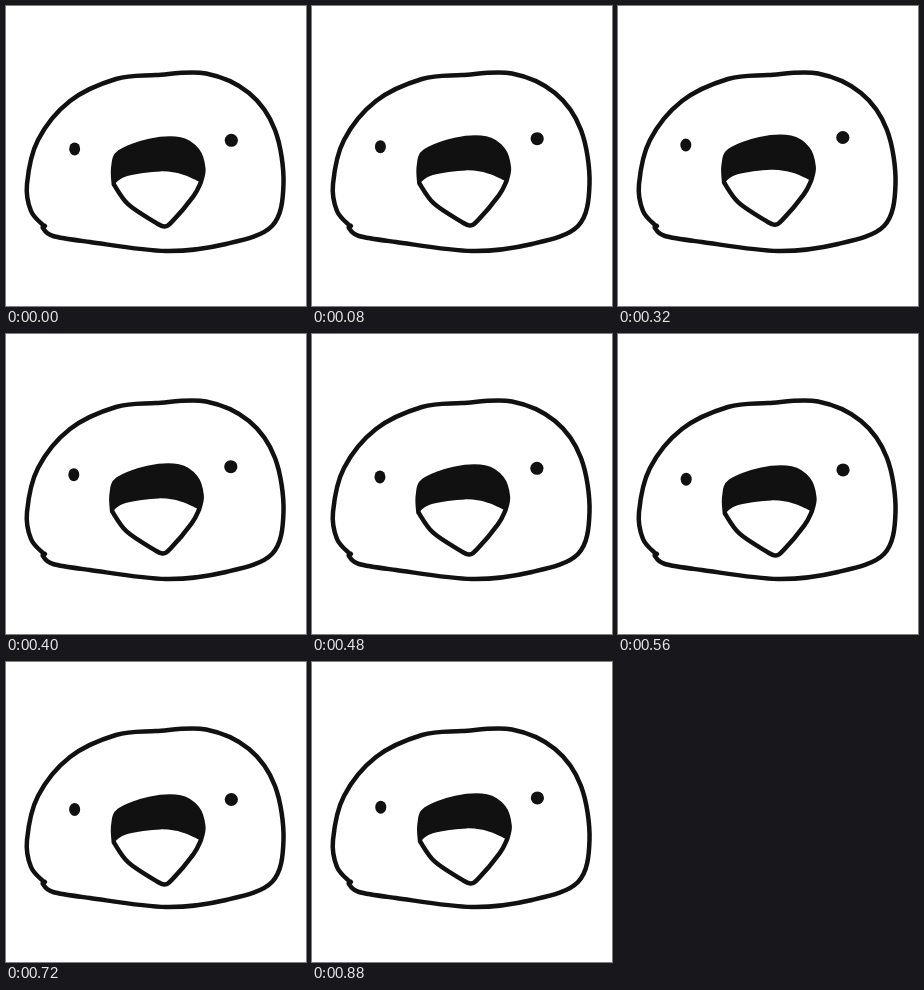
An HTML page that plays this animation: 300x300 px, repeating every 0.98 s.

```html
<!DOCTYPE html>
<html lang="en">
<head>
<meta charset="utf-8">
<title>Bird face</title>
<style>
  html, body { margin: 0; width: 100%; height: 100%; overflow: hidden; background: #fff; }
  svg { display: block; width: 100vw; height: 100vh; }
  .line { fill: none; stroke: #111; stroke-width: 4.5; stroke-linecap: round; stroke-linejoin: round; }
  .ink { fill: #111; }
</style>
</head>
<body>
<svg viewBox="0 0 300 300">
  <path id="head" class="line"/>
  <ellipse id="left" class="ink" rx="5.5" ry="6.5"/>
  <ellipse id="right" class="ink" rx="6.6" ry="6.5"/>
  <g id="mouth">
    <path id="gape" class="ink"/>
    <path id="beak" class="line"/>
  </g>
</svg>
<script>
const $ = id => document.getElementById(id);

// Smooth open curve through a string of "x,y" points
function curve(text) {
  const p = text.split(' ').map(s => s.split(',').map(Number));
  const at = i => p[Math.max(0, Math.min(p.length - 1, i))];
  let d = 'M' + p[0];
  for (let i = 0; i < p.length - 1; i++) {
    const [a, b, c, e] = [at(i - 1), at(i), at(i + 1), at(i + 2)];
    const c1 = b.map((v, k) => v + (c[k] - a[k]) / 6);
    const c2 = c.map((v, k) => v - (e[k] - b[k]) / 6);
    d += `C${c1} ${c2} ${c}`;
  }
  return d;
}

const upper = curve('107.5,179 107,162 113,147 143,135.5 174,134 191,145 197,163 194.5,177');
const lower = curve('194.5,177 187,191 166,216 158,221 149,217 122,199 107.5,179');
const lip = curve('194.5,177 176,169 154,166 121,170.5 107.5,179');

$('head').setAttribute('d', curve('38,220 25,205 21,178 32,134 64,95 110,73 150,69 200,67.5 243,87 269,124 277.5,178 266,220 220,238 160,245 84,236 47,230 37,222 39,220'));
$('gape').setAttribute('d', upper + lip.replace('M', 'L') + 'Z');
$('beak').setAttribute('d', upper + lower);

const STEP = 80, STEPS = 12, LOOP = 980;

function place(eye, x, y) {
  eye.setAttribute('cx', x);
  eye.setAttribute('cy', y);
}

// The face bobs once per loop, held on each step, with a slight sideways sway
function draw(now) {
  const step = Math.min(STEPS - 1, Math.floor(now % LOOP / STEP));
  const turn = 2 * Math.PI / STEPS;
  const bob = -Math.sin(step * turn);
  const sway = -Math.cos((step - 4.5) * turn);
  place($('left'), 68.3 + sway * .5, 142.9 + bob * 4.5);
  place($('right'), 225.1 + sway * .3, 134.3 + bob * 3.2);
  $('mouth').setAttribute('transform', `translate(${sway - .4} ${bob * 2 - .6})`);
}

const start = performance.now();
function tick() {
  draw(performance.now() - start);
  requestAnimationFrame(tick);
}
tick();
</script>
</body>
</html>
```
